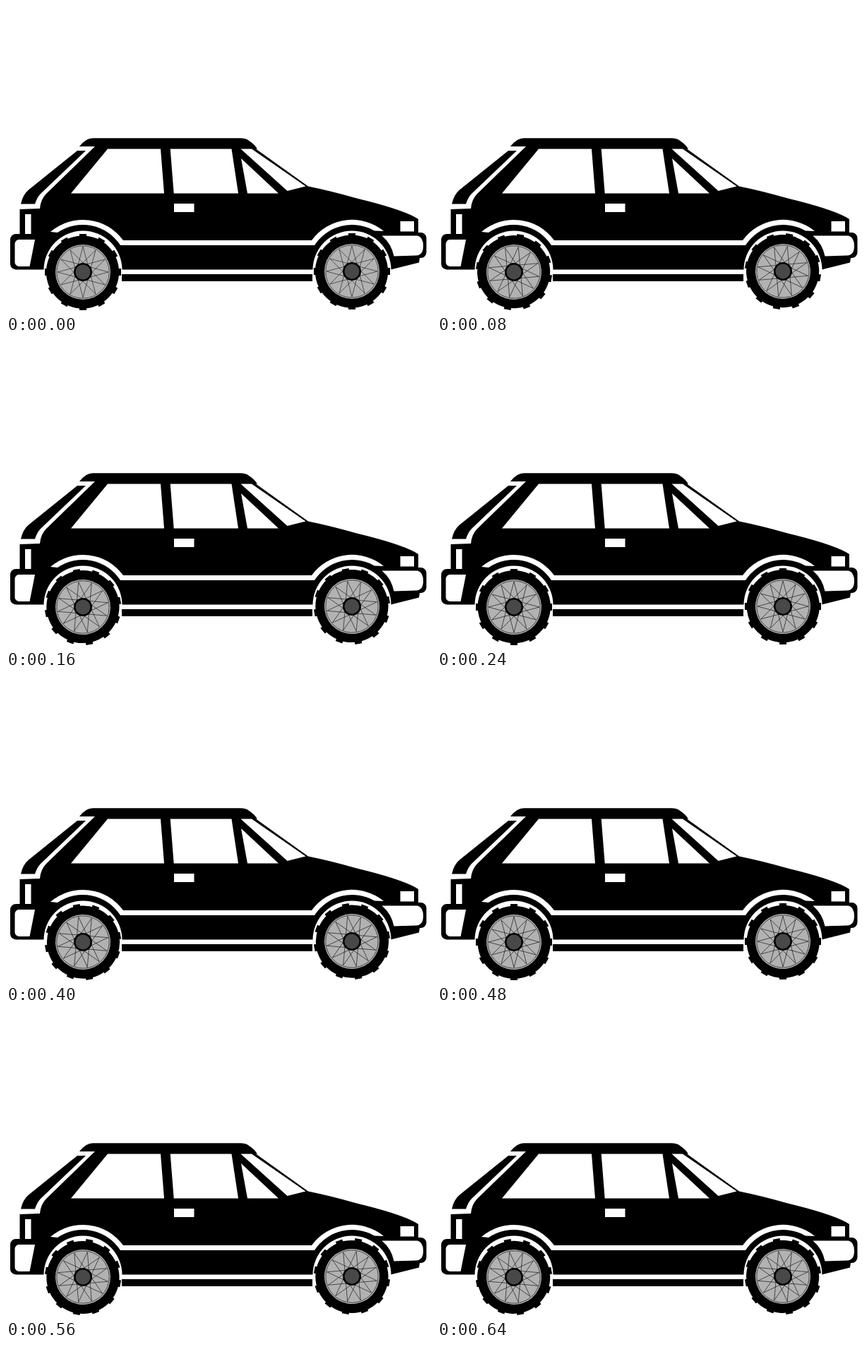
An HTML page for the animation above (720 ms loop, 602 by 435 pixels).

```html
<!DOCTYPE html>
<html lang="en">
<head>
<meta charset="utf-8">
<title>Car with turning wheels</title>
<style>
  html, body { margin: 0; width: 100%; height: 100%; overflow: hidden; background: #fff; }
  svg { display: block; width: 100vw; height: 100vh; }
</style>
</head>
<body>
<svg viewBox="0 0 602 435">
  <!-- body -->
  <path d="M104 199Q113 187.300 123 187.300H332Q340 187.300 345 191.500Q352 196 356 202.500H354L428 255.500Q460 262 495 272Q565 289 584 302V321H587.500A8 8 0 0 1 595.500 329V349A8 8 0 0 1 587.500 357H586L585 363.500L545 373.500H14A8 8 0 0 1 6 366V331A8 8 0 0 1 14 323H19.500V288L48 287Q49 274 57 266L126 199Z"/>
  <path d="M21 280.500Q24 267 32 260.500L101 205H113L49 266Q44 271 41 280.500Z"/>
  <path d="M164 380H434V390H164Z"/>
  <g fill="#fff">
    <!-- windows -->
    <path d="M144 202.500H219L224 265.500H92Z"/>
    <path d="M232.700 202.500H319.500L329 265.500H237.700Z"/>
    <path d="M333 216L342 265.500H386Z"/>
    <path d="M332.500 202.500H348L424.500 255.500L398.500 262Z"/>
    <!-- handle, lights, bumpers -->
    <path d="M238 280H266.500V292H238Z"/>
    <path d="M27 295H35.500V323H27Z"/>
    <path d="M558.500 305H578V319.500H558.500Z"/>
    <path d="M18 331H41L33.500 369H18A6 6 0 0 1 12.500 363V337A6 6 0 0 1 18 331Z"/>
    <path d="M532.500 325.500H583Q591 328 591 340Q591 353 581 353.500L549.500 354.500Q546 337 532.500 325.500Z"/>
    <!-- side stripe and arches -->
    <path d="M63 320A70.500 70.500 0 0 1 166 332H433A70.500 70.500 0 0 1 535 319L522 318.500A63.500 63.500 0 0 0 437 339H162A63.500 63.500 0 0 0 73 321Z"/>
    <circle cx="109" cy="374" r="55.500"/>
    <circle cx="490" cy="374" r="55.500"/>
  </g>
  <g id="wheels"></g>
</svg>
<script>
const STEP_MS = 80, STEPS = 9, TURN = 360 / STEPS;
const HUBS = [[109, 377], [490, 376]];

const point = (r, deg) => {
  const a = deg * Math.PI / 180;
  return (r * Math.sin(a)).toFixed(2) + ' ' + (-r * Math.cos(a)).toFixed(2);
};

function wheelMarkup() {
  let treads = '', star = '';
  for (let i = 0; i < 12; i++) {
    treads += `<rect x="-5" y="-54" width="10" height="6" transform="rotate(${i * 30})"/>`;
    star += (i ? 'L' : 'M') + point(36, i * 150);
  }
  // The tyre sits slightly off the axle, so it wobbles as it turns.
  return `<circle cx="-0.500" r="51.600"/>${treads}
    <circle r="39" fill="#b2b2b2"/>
    <circle r="37.200" fill="none" stroke="#222" stroke-width="0.700"/>
    <path d="${star}Z" fill="none" stroke="#000" stroke-width="0.550"/>
    <circle r="13"/><circle r="10.500" fill="#484848"/>`;
}

const holder = document.getElementById('wheels');
holder.innerHTML = HUBS.map(() => `<g>${wheelMarkup()}</g>`).join('');
const wheels = [...holder.children];

function draw(ms) {
  const step = Math.floor(ms / STEP_MS) % STEPS;
  wheels.forEach((wheel, i) =>
    wheel.setAttribute('transform', `translate(${HUBS[i]}) rotate(${step * TURN})`));
}

let start;
function tick(now) {
  start ??= now;
  draw(Math.max(0, now - start));
  requestAnimationFrame(tick);
}
draw(0);
requestAnimationFrame(tick);
</script>
</body>
</html>
```
